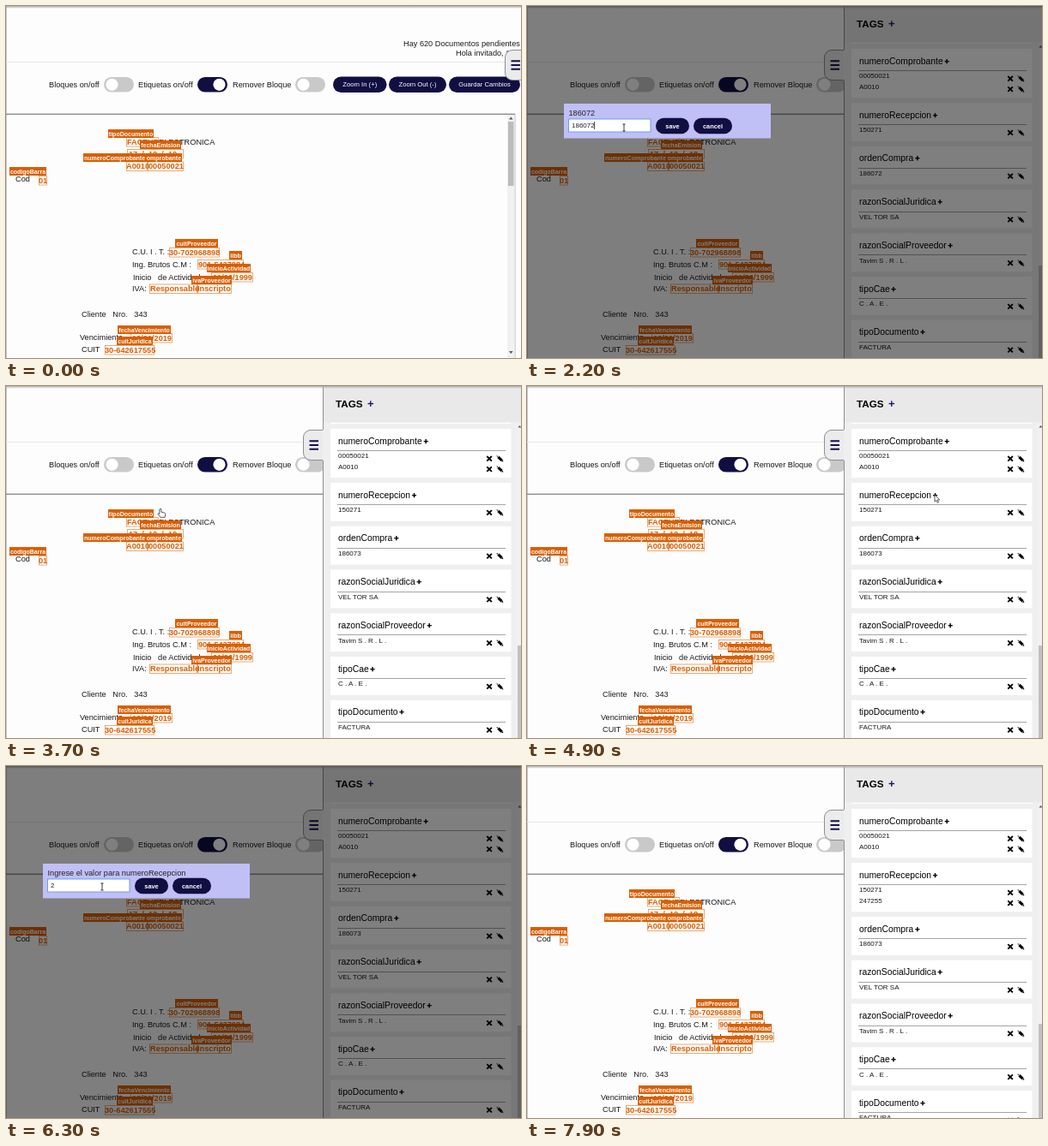
Animation, 600 px wide and 411 px high, one loop 8 s. Source, as an HTML page:

```html
<!DOCTYPE html>
<html lang="es">
<head>
<meta charset="utf-8">
<title>Editor de etiquetas</title>
<style>
  html, body { margin: 0; width: 100%; height: 100%; overflow: hidden; background: #fdfdfd; }
  svg { display: block; width: 600px; height: 411px; font-family: "Liberation Sans", Arial, sans-serif; }
  text { white-space: pre; }
</style>
</head>
<body>
<svg id="stage" viewBox="0 0 600 411">
  <defs>
    <linearGradient id="topShade" x2="0" y2="1">
      <stop stop-color="#a8a8a8"/><stop offset="1" stop-color="#a8a8a8" stop-opacity="0"/>
    </linearGradient>
    <clipPath id="listClip"><rect x="370" y="43" width="230" height="368"/></clipPath>
  </defs>
  <g id="page"></g>
  <g id="side">
    <path d="M370.5 51.5H355a8.5 8.5 0 0 0-8.5 8.5v18a8.5 8.5 0 0 0 8.5 8.5h15.500z" fill="#ebebeb" stroke="#8f8f94"/>
    <path d="M353.500 64.300h10.500m-10.500 4.700h10.500m-10.500 4.700h10.500" stroke="#151247" stroke-width="2"/>
    <rect x="369" width="235" height="411" fill="#efefef"/>
    <rect x="369" width="235" height="42" fill="#e9e9e9"/>
    <path d="M369.500 0v51m0 36v324" stroke="#8f8f94"/>
    <g clip-path="url(#listClip)">
      <g id="list"><g id="upper"></g><g id="lower"></g></g>
    </g>
    <rect x="595" y="43" width="5" height="368" fill="#f1f1f1"/>
    <path d="M596.500 48.500l2-2.500 2 2.500z" fill="#555"/>
    <rect id="thumb" x="596" y="52" width="5" height="118" fill="#c1c1c1"/>
  </g>
  <rect width="600" height="3" fill="url(#topShade)"/>
  <g id="modal">
    <rect width="600" height="411" opacity=".5"/>
    <rect x="43" y="114" width="241" height="40.500" fill="#c0bff6"/>
    <rect id="field" x="48.500" y="132" width="95.500" height="15" fill="#fff"/>
    <g id="dialog"></g>
    <path id="caret" d="M78.500 135v9" stroke="#222" stroke-width=".8"/>
  </g>
  <g id="cursor" stroke-linejoin="round">
    <path id="hand" d="M-1.200 2q1.200-2 2.100 0v3.200l3.600.8q1.400.5 1.200 2.100l-.6 3.200h-5.100l-3.200-3.900q.3-1.200 2 .1z" fill="#fff" stroke="#333" stroke-width=".8"/>
    <path id="arrow" d="M0 0v8.200l1.900-1.800 1.300 3 1.300-.6-1.300-2.800h2.700z" fill="#fff" stroke="#222" stroke-width=".7"/>
    <path id="beam" d="M-1.600-4h3.200M0-4v8m-1.600 0h3.200" fill="none" stroke="#222" stroke-width=".9"/>
  </g>
</svg>
<script>
const $ = id => document.getElementById(id);
const LOOP = 8000, NAVY = '#110e42', ORANGE = '#d95f02';
const ROW = 12.3, PITCH = 50.75, FIRST = 50, SCROLL = 8 * PITCH - 2;

const text = (x, y, s, size = 9.2, fill = '#1a1a1a', weight = 400, extra = '') =>
  `<text x="${x}" y="${y}" font-size="${size}" fill="${fill}" font-weight="${weight}" ${extra}>${s}</text>`;
const rect = (x, y, w, h, fill, extra = '') =>
  `<rect x="${x}" y="${y}" width="${w}" height="${h}" fill="${fill}" ${extra}/>`;
const pill = (x, y, w, label, weight, size) =>
  rect(x, y, w, 18.4, NAVY, 'rx="9.2"') +
  text(x + w / 2, y + 11.8, label, size, '#fff', weight, 'text-anchor="middle"');
const toggle = (x, on) =>
  rect(x, 83, 35, 17.6, on ? NAVY : '#c9c9c9', 'rx="8.8"') +
  `<circle cx="${x + (on ? 25.500 : 9.500)}" cy="91.800" r="7.100" fill="#fff"/>`;
const label = (x, y, w, s) =>
  rect(x, y, w, 10, ORANGE) + text(x + w / 2, y + 7.5, s, 7, '#fff', 700, 'text-anchor="middle"');
const box = (x, y, w, s, dx = 1) =>
  rect(x + .5, y + .5, w - 1, 10.5, 'none', `stroke="${ORANGE}" stroke-width=".8" stroke-opacity=".65"`) +
  text(x + dx, y + 8.5, s, 9.2, ORANGE, 700);

const words = [
  [178, 162, 'ELECTRONICA'], [11, 205, 'Cod'],
  [147, 290, 'C.U. I . T. :'], [147, 305.3, 'Ing. Brutos C.M :'],
  [148, 320.3, 'Inicio   de Actividades'], [147, 332.5, 'IVA:'],
  [88, 363.3, 'Cliente   Nro.   343'], [86, 390, 'Vencimiento'], [88, 404.2, 'CUIT']
];
const boxes = [
  [140, 153, 38, 'FACTURA'], [141, 167, 66, '17  /  12  /  18', 2],
  [140, 181.5, 25, 'A0010', 0], [165, 181.5, 42, '00050021'], [38, 198, 10, '01', 0],
  [190, 282, 59, '30-702968898', 0], [223, 296, 54, '901-5437084'],
  [239, 311, 49, '01/06/1999', 2], [167, 324.5, 56, 'Responsable'], [223, 324.5, 40, 'Inscripto', 0],
  [145, 382, 49, '12/01/2019', 2], [115, 396, 58, '30-642617555', 0]
];
const labels = [
  [119, 144, 53, 'tipoDocumento'], [156, 157, 48, 'fechaEmision'],
  [132, 172, 73, 'numeroComprobante'], [90, 172, 73, 'numeroComprobante'],
  [4, 188, 43, 'codigoBarra'], [197, 272, 50, 'cuitProveedor'], [260, 286, 15, 'iibb'],
  [234, 301, 51, 'inicioActividad'], [216, 315, 47, 'ivaProveedor'],
  [130, 373, 62, 'fechaVencimiento'], [129, 386, 42, 'cuitJuridica']
];

$('page').innerHTML =
  rect(0, 0, 600, 411, '#fdfdfd') + rect(0, 0, 1, 411, '#c4c4c8') +
  text(463, 46.5, 'Hay 620 Documentos pendientes') +
  text(524, 57.5, 'Hola invitado, <tspan fill="#4a55b5">Salir</tspan>') +
  rect(0, 65, 600, 1, '#e8e8e8') +
  text(50, 94.5, 'Bloques on/off') + toggle(114) +
  text(154, 94.5, 'Etiquetas on/off') + toggle(223, true) +
  text(264, 94.5, 'Remover Bloque') + toggle(337) +
  pill(381, 82.6, 62.5, 'Zoom In (+)', 400, 7.7) +
  pill(446, 82.6, 67, 'Zoom Out (-)', 400, 7.7) +
  pill(516, 82.6, 83, 'Guardar Cambios', 400, 7.7) +
  rect(0, 125.6, 593, 1.4, '#8c8c90') + rect(592.5, 126, 1, 285, '#b5b5b5') +
  rect(584, 127, 8.5, 284, '#f1f1f1') + rect(585, 135, 6.5, 75, '#bcbcbc') +
  '<path d="M586 132.500l2.300-3 2.300 3zM586 403l2.300 3 2.300-3z" fill="#555"/>' +
  words.map(w => text(...w)).join('') +
  boxes.map(b => box(...b)).join('') +
  labels.map(l => label(...l)).join('');

const icons = y =>
  `<path d="M560.300 ${y - 2.800}l5.600 5.600m0-5.600l-5.600 5.600" stroke="#000" stroke-width="1.900"/>` +
  `<path d="M573.400 ${y - 1.900}l4.200 3.900" stroke="#000" stroke-width="3.200"/>` +
  `<path d="M571.500 ${y - 3.600}l1.900.5-1.300 1.300zM577 ${y + 3.200}l2.300.4-.4-2.300z" fill="#000"/>`;
const value = (y, s) => text(387, y + 34.3, s, 8) + icons(y + 34.8);
const plus = '<tspan dx="1.700" font-size="9.500" font-weight="700" stroke="#000" stroke-width=".4">+</tspan>';
const card = (y, title, values, id = '') =>
  rect(378, y, 210.5, 44.8 + (values.length - 1) * ROW, '#fff', id && `id="${id}"`) +
  text(387, y + 17.6, title + plus, 10.35, '#000') +
  rect(386, y + 25, 196, 1, '#a4a4a4', 'shape-rendering="crispEdges"') +
  values.map((v, i) => value(y + i * ROW, v)).join('');

const above = [
  ['codigoBarra', '01'], ['cuitJuridica', '30-642617555'], ['cuitProveedor', '30-702968898'],
  ['fechaEmision', '17 / 12 / 18'], ['fechaVencimiento', '12/01/2019'], ['iibb', '901-5437084'],
  ['inicioActividad', '01/06/1999'], ['ivaProveedor', 'Responsable Inscripto']
];
const below = [
  ['ordenCompra', '186072'], ['razonSocialJuridica', 'VEL TOR SA'],
  ['razonSocialProveedor', 'Tavim S . R . L .'], ['tipoCae', 'C . A . E .'], ['tipoDocumento', 'FACTURA']
];
const second = FIRST + PITCH + ROW;
$('upper').innerHTML =
  above.map(([k, v], i) => card(FIRST - (8 - i) * PITCH, k, [v])).join('') +
  card(FIRST, 'numeroComprobante', ['00050021', 'A0010']) +
  card(second, 'numeroRecepcion', ['150271'], 'reception') +
  `<g id="added">${value(second + ROW, '247255')}</g>`;
$('lower').innerHTML =
  below.map(([k, v], i) => card(second + (i + 1) * PITCH, k, [v])).join('');
$('side').insertAdjacentHTML('beforeend',
  text(384, 25, 'TAGS', 11.7, '#000', 700) + text(421, 25, '+', 13, '#1d1a66', 700));

$('dialog').innerHTML =
  text(48.5, 128.3, '', 9.2, '#222', 400, 'id="prompt"') +
  text(52, 142.3, '', 8, '#222', 400, 'id="typed"') +
  pill(150, 130.8, 39, 'save', 700, 7.4) + pill(194, 130.8, 45, 'cancel', 700, 7.4);
const order = $('lower').querySelectorAll('text')[1];

const EDIT = [1700, 3700], ADD = [5100, 7500];
const within = (t, [a, b]) => t >= a && t < b;
const show = (id, on) => $(id).setAttribute('visibility', on ? 'inherit' : 'hidden');
const ease = k => k * k * (3 - 2 * k);
const ramp = (t, a, b) => ease(Math.min(1, Math.max(0, (t - a) / (b - a))));

const path = [
  [0, 593, 69], [550, 593, 69], [800, 560, 150], [1000, 560, 170], [1350, 576, 198], [1700, 576, 198],
  [2050, 113, 142], [3050, 113, 142], [3450, 170, 141], [3600, 170, 141], [3700, 180, 142],
  [3900, 180, 142], [4600, 475, 127], [5400, 475, 127], [5950, 112, 141], [6850, 112, 141],
  [7250, 171, 141], [8000, 171, 141]
];
const shapes = [
  [0, ''], [200, 'hand'], [650, 'arrow'], [1300, 'hand'], [1780, 'arrow'], [2000, 'beam'], [3200, 'arrow'],
  [3380, 'hand'], [3900, 'arrow'], [5880, 'beam'], [7050, 'arrow'], [7180, 'hand'], [7600, '']
];

function cursorAt(t) {
  const i = path.findIndex(p => p[0] > t);
  const [a, x, y] = path[i - 1], [b, u, v] = path[i];
  const k = ramp(t, a, b);
  return [x + (u - x) * k, y + (v - y) * k];
}

function typedAt(t) {
  if (t < EDIT[1]) return t < 2600 ? '186072' : t < 2850 ? '18607' : '186073';
  return '247255'.slice(0, Math.max(0, Math.floor((t - 6200) / 110) + 1));
}

function draw(t) {
  const editing = within(t, EDIT), open = editing || within(t, ADD);
  const added = t >= ADD[1], scroll = ramp(t, 650, 1100);

  $('side').setAttribute('transform', `translate(${235 * (1 - ramp(t, 200, 550))} 0)`);
  $('list').setAttribute('transform', `translate(0 ${SCROLL * (1 - scroll)})`);
  $('thumb').setAttribute('y', 52 + 251 * scroll - (added ? 2 : 0));
  $('lower').setAttribute('transform', `translate(0 ${added ? ROW : 0})`);
  $('reception').setAttribute('height', 44.8 + (added ? ROW : 0));
  show('added', added);
  order.textContent = t < EDIT[1] ? '186072' : '186073';

  show('modal', open);
  const focus = within(t, [2100, 3500]) || within(t, [6050, 7250]);
  const typed = typedAt(t);
  $('prompt').textContent = editing ? '186072' : 'Ingrese el valor para numeroRecepcion';
  $('typed').textContent = typed;
  $('field').setAttribute('stroke', focus ? '#6f9df0' : '#d5d5ea');
  $('caret').setAttribute('transform', `translate(${(typed.length - 6) * 4.45} 0)`);
  show('caret', open && focus && (t - 2100) % 1060 < 530);

  const shape = shapes.findLast(s => s[0] <= t)[1];
  for (const id of ['hand', 'arrow', 'beam']) show(id, id === shape);
  $('cursor').setAttribute('transform', `translate(${cursorAt(t).join(' ')})`);
}

const start = performance.now();
function tick() {
  draw((performance.now() - start) % LOOP);
  requestAnimationFrame(tick);
}
tick();
</script>
</body>
</html>
```
